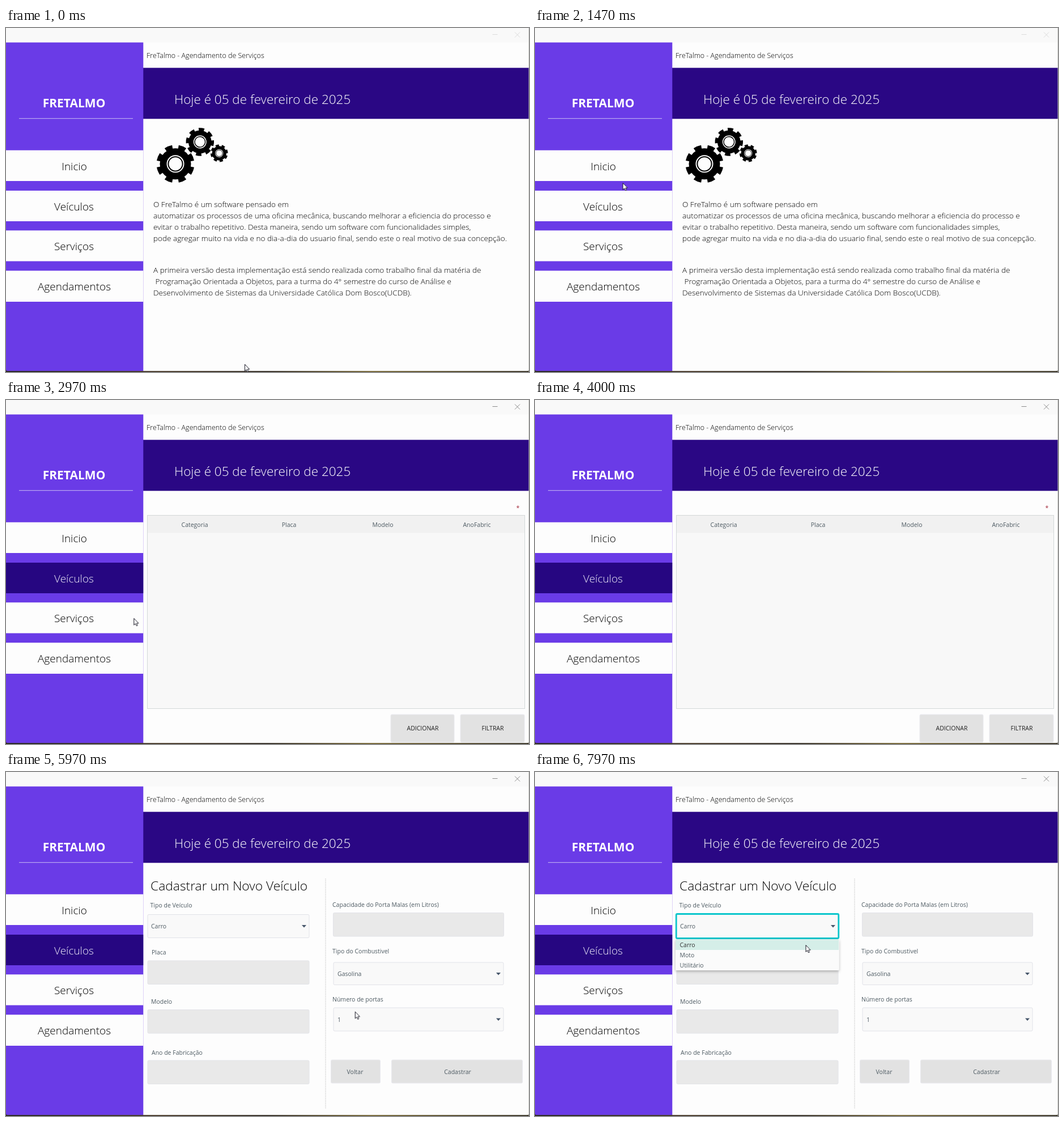
These frames come from a looping animation (923 px wide and 607 px high, 8000 ms). An HTML page:

```html
<!DOCTYPE html>
<html lang="pt-BR">
<head>
<meta charset="utf-8">
<title>FreTalmo</title>
<style>
html, body { margin: 0; width: 100%; height: 100%; overflow: hidden; background: #fdfdfd; }
svg { display: block; }
text { font: 10.5px "Open Sans", "Noto Sans", sans-serif; fill: #4d5a62; white-space: pre; }
.mid text, text.mid { text-anchor: middle; }
.menu text { font-size: 19px; font-weight: 300; fill: #000; }
.body text { font-size: 13.55px; font-weight: 300; fill: #000; }
text.heading { font-size: 22.8px; font-weight: 300; fill: #000; }
text.date { font-size: 22.5px; font-weight: 300; fill: #fff; }
text.app { font-size: 12.5px; font-weight: 300; fill: #000; }
text.brand { font-size: 21px; font-weight: 700; fill: #fff; }
.menu text.light { fill: #f2effc; }
.caps text { fill: #222; }
.field { fill: #e9e9e9; stroke: #e2e3e8; }
.combo { fill: #f9f9f9; stroke: #e1e2e8; }
.button { fill: #e2e2e2; stroke: #e9e9ef; }
.caret { fill: #46566a; }

.home, .list, .form, .active, .popup, .hand, .arrow, .caret.live, .controls {
  animation: 8s step-end infinite;
}
.home { animation-name: home; }
.list { animation-name: list; }
.form { animation-name: form; }
.active { animation-name: active; }
.popup { animation-name: popup; }
.hand { animation-name: hand; }
.arrow { animation-name: arrow; }
.caret.live { animation-name: hover; }
.controls { fill: none; animation-name: focus; }
.pointer { animation: travel 8s linear infinite; }

@keyframes home { 0% { visibility: visible } 33%, 100% { visibility: hidden } }
@keyframes list { 0% { visibility: hidden } 33% { visibility: visible } 58.5%, 100% { visibility: hidden } }
@keyframes form { 0% { visibility: hidden } 58.5%, 100% { visibility: visible } }
@keyframes active { 0% { visibility: hidden } 33%, 100% { visibility: visible } }
@keyframes popup { 0% { visibility: hidden } 90%, 100% { visibility: visible } }
@keyframes hand { 0% { visibility: hidden } 21% { visibility: visible } 35.5%, 100% { visibility: hidden } }
@keyframes arrow { 0% { visibility: visible } 21% { visibility: hidden } 35.5%, 100% { visibility: visible } }
@keyframes hover { 0% { fill: #46566a } 82.5% { fill: #8296b2 } 90%, 100% { fill: #46566a } }
@keyframes focus { 0% { stroke: #dcdcdc } 32.5%, 100% { stroke: #8b8b8b } }
@keyframes travel {
  0%, 4% { transform: translate(421px, 593px) }
  8% { transform: translate(350px, 500px) }
  12% { transform: translate(240px, 365px) }
  16% { transform: translate(165px, 283px) }
  18.4% { transform: translate(154.5px, 273px) }
  21% { transform: translate(145px, 288px) }
  25%, 34% { transform: translate(128px, 312px) }
  36% { transform: translate(165px, 345px) }
  41% { transform: translate(430px, 520px) }
  45% { transform: translate(660px, 612px) }
  50% { transform: translate(720px, 612px) }
  54%, 65% { transform: translate(734.5px, 588px) }
  69% { transform: translate(705px, 540px) }
  75% { transform: translate(610px, 415px) }
  81% { transform: translate(520px, 295px) }
  85.5%, 92% { transform: translate(503px, 279px) }
  97% { transform: translate(482px, 302px) }
  99.6%, 100% { transform: translate(477.5px, 305px) }
}
</style>
</head>
<body>
<svg width="923" height="607" viewBox="0 0 923 607">
  <defs>
    <g id="gear">
      <circle r="27.5"/>
      <circle r="30" pathLength="16" fill="none" stroke="#000" stroke-width="7" stroke-dasharray="1.1 .9" transform="rotate(10.1)"/>
      <circle r="15.5" fill="#fdfdfd"/>
      <circle r="12.6" fill="none" stroke="#000" stroke-width="2"/>
    </g>
    <path id="caret" d="M-4-2H4L0 2.5Z"/>
    <linearGradient id="desktop">
      <stop offset="0" stop-color="#15130f"/>
      <stop offset=".3" stop-color="#3a2a18"/>
      <stop offset=".5" stop-color="#221b12"/>
      <stop offset=".7" stop-color="#6b5a24"/>
      <stop offset="1" stop-color="#2a2415"/>
    </linearGradient>
    <filter id="shadow" x="-5%" y="-20%" width="110%" height="150%">
      <feDropShadow dx="0" dy="2" stdDeviation="2.5" flood-opacity=".28"/>
    </filter>
  </defs>

  <rect width="923" height="607" fill="#fdfdfd"/>
  <rect width="923" height="25.5" fill="#f9f9f9"/>
  <g class="controls">
    <path d="M858.5 11.5H867.5M898 7.5L907 16.5M907 7.5L898 16.5"/>
  </g>
  <text class="app" x="248" y="53">FreTalmo - Agendamento de Serviços</text>
  <rect x="242" y="70.3" width="681" height="90" fill="#2a0784"/>
  <text class="date" x="297" y="134">Hoje é 05 de fevereiro de 2025</text>

  <rect y="25.5" width="242.3" height="580" fill="#6a3be7"/>
  <text class="brand mid" x="120" y="140">FRETALMO</text>
  <path d="M23 159.7H224" stroke="#c9bdf2"/>
  <g class="menu mid">
    <path d="M0 215.7H242.3V270H0ZM0 287H242.3V341H0ZM0 357.3H242.3V411.6H0ZM0 428.3H242.3V483H0Z" fill="#fdfdfd"/>
    <text x="120.5" y="250.5">Inicio</text>
    <text x="120" y="321.5">Veículos</text>
    <text x="120" y="392">Serviços</text>
    <text x="120.5" y="463">Agendamentos</text>
    <g class="active">
      <rect y="287" width="242.3" height="54" fill="#260681"/>
      <text class="light" x="120" y="321.5">Veículos</text>
    </g>
  </g>

  <g class="home body">
    <use href="#gear" transform="translate(299 239.8)"/>
    <use href="#gear" transform="translate(342.3 201) rotate(-17) scale(.74)"/>
    <use href="#gear" transform="translate(376.3 221) rotate(7) scale(.46)"/>
    <text x="260" y="315.5">O FreTalmo é um software pensado em</text>
    <text x="260" y="335.5">automatizar os processos de uma oficina mecânica, buscando melhorar a eficiencia do processo e</text>
    <text x="260" y="355.5">evitar o trabalho repetitivo. Desta maneira, sendo um software com funcionalidades simples,</text>
    <text x="260" y="375.5">pode agregar muito na vida e no dia-a-dia do usuario final, sendo este o real motivo de sua concepção.</text>
    <text x="260" y="431.5">A primeira versão desta implementação está sendo realizada como trabalho final da matéria de</text>
    <text x="263.5" y="451.5">Programação Orientada a Objetos, para a turma do 4° semestre do curso de Análise e</text>
    <text x="260" y="471.5">Desenvolvimento de Sistemas da Universidade Católica Dom Bosco(UCDB).</text>
  </g>

  <g class="list">
    <text x="900.5" y="194" style="fill:#a32a3a">*</text>
    <rect x="249.5" y="203.5" width="666" height="341" fill="#f8f8f8" stroke="#d3d8d8"/>
    <rect x="250" y="204" width="665" height="30.5" fill="#f1f1f1"/>
    <g class="mid">
      <text x="333" y="223.5">Categoria</text>
      <text x="499.5" y="223.5">Placa</text>
      <text x="665" y="223.5">Modelo</text>
      <text x="831" y="223.5">AnoFabric</text>
    </g>
    <g class="mid caps">
      <rect class="button" x="679" y="555" width="112" height="49" rx="2"/>
      <rect class="button" x="802" y="555" width="113" height="49" rx="2"/>
      <text x="735.5" y="583">ADICIONAR</text>
      <text x="859" y="583">FILTRAR</text>
    </g>
  </g>

  <g class="form">
    <text class="heading" x="255" y="209">Cadastrar um Novo Veículo</text>
    <path d="M564 188V594" stroke="#c9c9c9" stroke-dasharray="2 1"/>

    <text x="254.5" y="239">Tipo de Veículo</text>
    <rect class="combo" x="250" y="251.5" width="285" height="41" rx="2"/>
    <text x="256" y="276">Carro</text>
    <use href="#caret" class="caret live" x="526" y="272"/>
    <text x="257" y="322">Placa</text>
    <rect class="field" x="250" y="333" width="285" height="41.5" rx="2"/>
    <text x="256" y="409">Modelo</text>
    <rect class="field" x="250" y="419.5" width="285" height="41.5" rx="2"/>
    <text x="257" y="499">Ano de Fabricação</text>
    <rect class="field" x="250" y="509" width="285" height="41.5" rx="2"/>

    <text x="576" y="238">Capacidade do Porta Malas (em Litros)</text>
    <rect class="field" x="577.5" y="248.5" width="301" height="41.5" rx="2"/>
    <text x="576" y="319.5">Tipo do Combustivel</text>
    <rect class="combo" x="578" y="336" width="300" height="39.5" rx="2"/>
    <text x="585" y="359.5">Gasolina</text>
    <use href="#caret" class="caret" x="869" y="356"/>
    <text x="576" y="405">Número de portas</text>
    <rect class="combo" x="578" y="416" width="300" height="41" rx="2"/>
    <text x="585" y="440.5">1</text>
    <use href="#caret" class="caret" x="869" y="436.5"/>

    <g class="mid">
      <rect class="button" x="573.5" y="508" width="87" height="41" rx="2"/>
      <rect class="button" x="680.5" y="508" width="231" height="41" rx="2"/>
      <text x="616" y="533">Voltar</text>
      <text x="797" y="533">Cadastrar</text>
    </g>
  </g>

  <g class="popup">
    <rect x="249.2" y="250.5" width="286.6" height="43" rx="2" fill="none" stroke="#0cc6cc" stroke-width="2.8"/>
    <rect x="248" y="295" width="288.5" height="55" rx="2" fill="#fbfbfb" filter="url(#shadow)"/>
    <rect x="248" y="295.5" width="288" height="18.5" fill="#d5eee8"/>
    <text x="255.5" y="308.5" style="fill:#333">Carro</text>
    <text x="255.5" y="326.5">Moto</text>
    <text x="255.5" y="344.5">Utilitário</text>
  </g>

  <rect y="605.3" width="923" height="1.7" fill="url(#desktop)"/>
  <path d="M0 602Q0 606 4 606V607H0ZM923 602Q923 606 919 606V607H923Z" fill="#2a2415"/>
  <path d="M922.6 0V607" stroke="#b9b9b4" stroke-width=".7"/>

  <g class="pointer" fill="#fff" stroke="#1b1b28" stroke-linejoin="round">
    <path class="arrow" d="M.5.5V12.3L3.2 9.8L5 13.8L6.9 13L5.2 9.1H8.7Z"/>
    <path class="hand" d="M-1.2 10V1.2Q0-.6 1.2 1.2V6Q2.6 5 3.4 6.4Q4.8 5.6 5.4 7Q7.2 6.6 7.4 8.4V12Q7 14 5.8 15.5V17.5H-1V15.5L-5 10.4Q-4.4 8.4-2.6 9.4Z"/>
  </g>
</svg>
</body>
</html>
```
